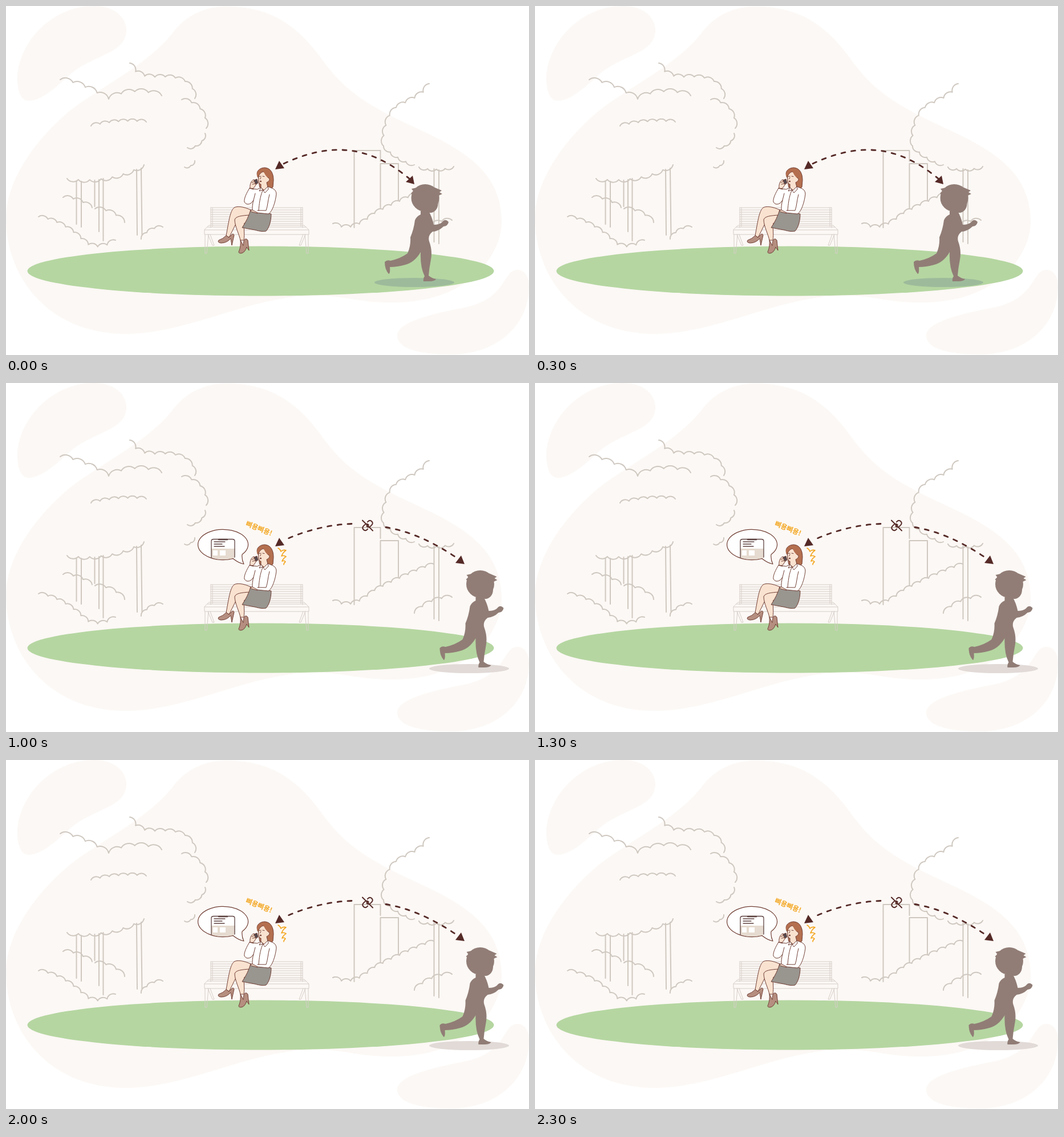
Write an HTML page that moves like this. It is 917 px wide and 611 px high and loops after 2.5 s.

```html
<!DOCTYPE html>
<html lang="ko">
<head>
<meta charset="utf-8">
<style>
  html, body { margin: 0; width: 100%; height: 100%; overflow: hidden; background: #fff; }
  svg { display: block; fill: none; stroke-linecap: round; stroke-linejoin: round; }
  .blob { fill: #fcf8f5; }
  .trees { stroke: #cfc8c0; stroke-width: 2; }
  .bench { stroke: #d6cec8; stroke-width: 1; }
  .woman { stroke: #713f35; stroke-width: 1; }
  .skin { fill: #f9e2d0; }
  .hair { fill: #b46f4f; }
  .shirt { fill: #fff; }
  .shoe { fill: #b58e80; }
  .child { fill: #917d76; }
  .dash { stroke: #552a27; stroke-width: 2.8; stroke-dasharray: 7 10.8; }
  .head { fill: #552a27; }
  .alarm { stroke: #f3a51d; stroke-width: 1.6; }
  .alarm text { font: 700 12px "Noto Sans CJK KR", "Noto Sans CJK", sans-serif; fill: #f3a51d; stroke: none; }
</style>
</head>
<body>
<svg width="917" height="611" viewBox="0 0 917 611">
  <g class="blob">
    <path d="M0 372C0 310 45 240 110 185C160 145 245 105 290 50C315 15 350 1 386 1C455 1 505 25 555 95C590 143 625 168 690 200C775 240 869 275 869 378C869 436 810 519 680 519C610 519 600 507 540 507C430 507 320 574 210 574C70 574 0 470 0 372Z"/>
    <path d="M20 128C20 70 75 0 155 0C190 0 211 20 211 42C211 85 150 85 110 122C85 145 60 166 40 166C26 166 20 148 20 128Z"/>
    <path d="M897 462C910 462 917 475 917 490C917 560 860 610 780 610C725 610 686 600 686 577C686 555 740 540 804 528C880 512 870 462 897 462Z"/>
  </g>
  <g class="trees">
    <path id="leaves"/>
    <path d="M123.500 307V382M132 307V387M155.500 305V351M163 304V395M170.500 302V411M229 286L230 401M237 284L238.500 401"/>
    <path d="M610.500 388V253H656.500V272M656.500 355V276H688V340M750.500 285V413M759 287V416"/>
  </g>
  <ellipse cx="446.5" cy="464" rx="409" ry="43.5" fill="#b5d6a1"/>

  <g class="bench">
    <path id="slats"/>
    <path d="M359 388V353M362 386V353M517 386V353M520 388V353M356 384H523L531 392V400H348V392ZM348 392H531M353 387H526"/>
    <path id="leg" d="M349 400V433H352L355 400M358 400L365 419H362L354 400"/>
    <use href="#leg" transform="matrix(-1 0 0 1 879 0)"/>
  </g>

  <g class="woman">
    <path class="hair" d="M442 300C436 290 445 283 454 283C465 284 469 294 469 305L468 317Q466 320 462 319L445 317Z"/>
    <path class="skin" d="M443 298C442 304 443 312 447 312L447 318L453 323L459 317L457 309C463 306 463 302 460 301C459 297 454 291 451 290Q445 292 443 298Z"/>
    <path class="hair" d="M441 300Q444 291 451 289Q454 296 459 301Q463 296 460 288L450 285Q437 288 441 300Z" stroke="none"/>
    <path d="M444.500 298.500L447 298M450 298L453 298.500M447 300L445.500 303"/>
    <circle cx="446.5" cy="307" r="1" fill="#9a3e35"/>

    <path class="skin" d="M428 319C427 312 430 306 434 304L439 306L439 312L434 319Z"/>
    <path fill="#514a50" d="M435 305L440 303L442 310L438 312Z"/>
    <path d="M431 309L437 307M432 312L437 311"/>
    <path class="skin" d="M429 357C417 351 405 350 400 353C393 359 391 375 386 402L391 405C399 391 405 374 411 371L430 372Z"/>
    <path class="skin" d="M427 366C413 367 403 368 401 374C401 385 409 400 411 410L417 410C419 398 416 387 418 380L428 384Z"/>
    <path fill="#99958f" d="M429 357L465 364C465 377 461 389 456 394Q450 396 436 392L414 388C421 378 426 367 429 357Z"/>
    <path class="skin" d="M429 358Q435 355 442 359L441 363L430 360Z"/>
    <path class="shirt" d="M440 321L427 319C422 327 417 337 418 343Q422 350 430 345L434 340C432 347 432 352 432 357L441 362L460 364C466 361 472 346 474 329Q474 321 464 318L459 316L452 323L447 318Z"/>
    <path d="M427 319L434 321M447 318L444 324L450 322L454 327L460 321L459 316M450 323C445 335 444 347 443 358M462 330C459 341 459 350 456 358L441 358M434 340L437 328"/>
    <path class="shoe" d="M386 402Q380 408 373 410Q370 414 377 415Q387 415 394 407L396 419L400 401Q398 397 395 401L391 405Z"/>
    <path class="shoe" d="M411 410Q412 420 409 428Q406 433 412 433Q419 432 422 422L426 428L424 410Q420 405 417 411L416 419Z"/>
  </g>

  <g id="near">
    <ellipse cx="716" cy="484" rx="70" ry="8" fill="#9dbb9b"/>
    <path class="dash" d="M487 276C560 242 631 238 708 303"/>
    <path class="head" d="M716 312L701 308L713 297Z"/>
  </g>
  <g id="far">
    <ellipse cx="812" cy="500" rx="70" ry="8" fill="#e1dad7"/>
    <path class="dash" d="M606 246.500Q544 249 486 276M666 252.500Q728 263 793 308"/>
    <path class="head" d="M804 317L788 315L798 302Z"/>
    <g stroke="#552a27" stroke-width="2.2" transform="translate(634 249.500) scale(.9)">
      <path d="M-10 -10L10 10"/>
      <path id="link" d="M-2 1a5 5 0 0 0 7.500.5l3-3a5 5 0 0 0-7-7l-1.700 1.700"/>
      <use href="#link" transform="rotate(180)"/>
    </g>
  </g>
  <path class="head" d="M472 286L479 271L488 284Z"/>

  <g id="child" class="child">
    <ellipse cx="735" cy="336" rx="24.500" ry="24"/>
    <ellipse cx="744" cy="346" rx="13.500" ry="16"/>
    <path d="M720 318L711 320L714 324L710 328L716 333ZM750 317L764 323L760 326L765 329L756 333Z"/>
    <path d="M727 359H741Q747 369 750 383Q759 383 764 379Q770 371 776 378Q775 385 767 386Q759 394 748 395Q739 402 742 412Q748 428 745 444Q742 459 741 472Q747 477 754 478Q752 482 742 482H732Q731 477 734 473Q726 457 727 431Q716 449 700 453Q686 457 673 457Q674 468 671 469Q664 461 664 448Q668 444 674 446Q692 442 704 433Q710 420 709 405Q715 391 717 375Q720 368 727 365Z"/>
  </g>

  <g id="speech">
    <path d="M398 307.300A44 26.500 0 1 1 414 300.200Q413 309 417 317Q407 315 398 307.300Z" fill="#fff" stroke="#713f35" stroke-width="1.2"/>
    <clipPath id="screen"><ellipse cx="380.5" cy="283" rx="43.400" ry="25.900"/></clipPath>
    <g clip-path="url(#screen)" stroke="#5d4240" stroke-width="1.300">
      <path d="M360 290H401V309H360Z" fill="#e6dbd0" stroke="none"/>
      <path d="M363 293H371V302H363ZM375 293H385V302H375Z" fill="#fff" stroke="none"/>
      <path d="M360 310V277Q360 273.500 364 273.500H397Q401 273.500 401 277V310M365 278H384M365 282H379M365 286H383"/>
      <path d="M373 274H388" stroke-width="2.600"/>
    </g>
  </g>
  <g id="alarm" class="alarm">
    <text transform="translate(419.500 249.500) rotate(22)">삐용삐용!</text>
    <path d="M477 289Q481 291 482 295Q486 291 491 293Q486 296 483 303Q487 301 491 304Q486 307 484 312Q488 310 490 313Q487 315 487 318"/>
  </g>
</svg>
<script>
const $ = id => document.getElementById(id);

// Leafy edge: equal arcs strung along a guide curve
function scallop(guide, bumps, sweep = 1) {
  const curve = document.createElementNS('http://www.w3.org/2000/svg', 'path');
  curve.setAttribute('d', guide);
  const step = curve.getTotalLength() / bumps, r = step * 0.65;
  let d = '';
  for (let i = 0; i <= bumps; i++) {
    const { x, y } = curve.getPointAtLength(i * step);
    d += (i ? `A${r} ${r} 0 0 ${sweep} ` : 'M') + x + ' ' + y;
  }
  return d;
}

$('leaves').setAttribute('d', [
  ['M95 129Q125 132 180 163', 4],
  ['M180 163Q220 140 273 157', 4],
  ['M217 100Q228 128 268 124Q330 122 331 162', 8],
  ['M308 164Q352 172 351 214', 4],
  ['M349 223Q344 246 318 248', 3],
  ['M331 271Q328 281 313 282', 2],
  ['M149 210Q200 198 246 203', 6],
  ['M100 335Q125 336 151 353', 3],
  ['M156 355Q188 357 208 379', 3],
  ['M57 369Q105 378 139 415Q165 430 192 410', 9],
  ['M237 408Q250 388 275 387', 3],
  ['M573 381Q605 400 645 364Q690 340 750 317', 12],
  ['M716 403Q744 376 782 375', 4],
  ['M107 302Q180 312 242 278', 7, 0],
  ['M742 136C735 160 690 170 677 183Q660 215 662 245', 8, 0],
  ['M662 245Q685 268 716 278', 4, 0],
  ['M724 282Q755 290 785 281', 4, 0]
].map(edge => scallop(...edge)).join(''));

let slats = '';
for (let y = 353; y <= 381; y += 4) slats += `M359 ${y}H520`;
$('slats').setAttribute('d', slats);

function draw() {
  const step = Math.floor(performance.now() % 2500 / 500);
  const show = (id, on) => $(id).style.display = on ? '' : 'none';
  show('near', step === 0);
  show('far', step > 0);
  show('speech', step > 1);
  show('alarm', step === 2 || step === 4);
  $('child').setAttribute('transform', step ? 'translate(96.5 16)' : '');
  requestAnimationFrame(draw);
}
draw();
</script>
</body>
</html>
```
